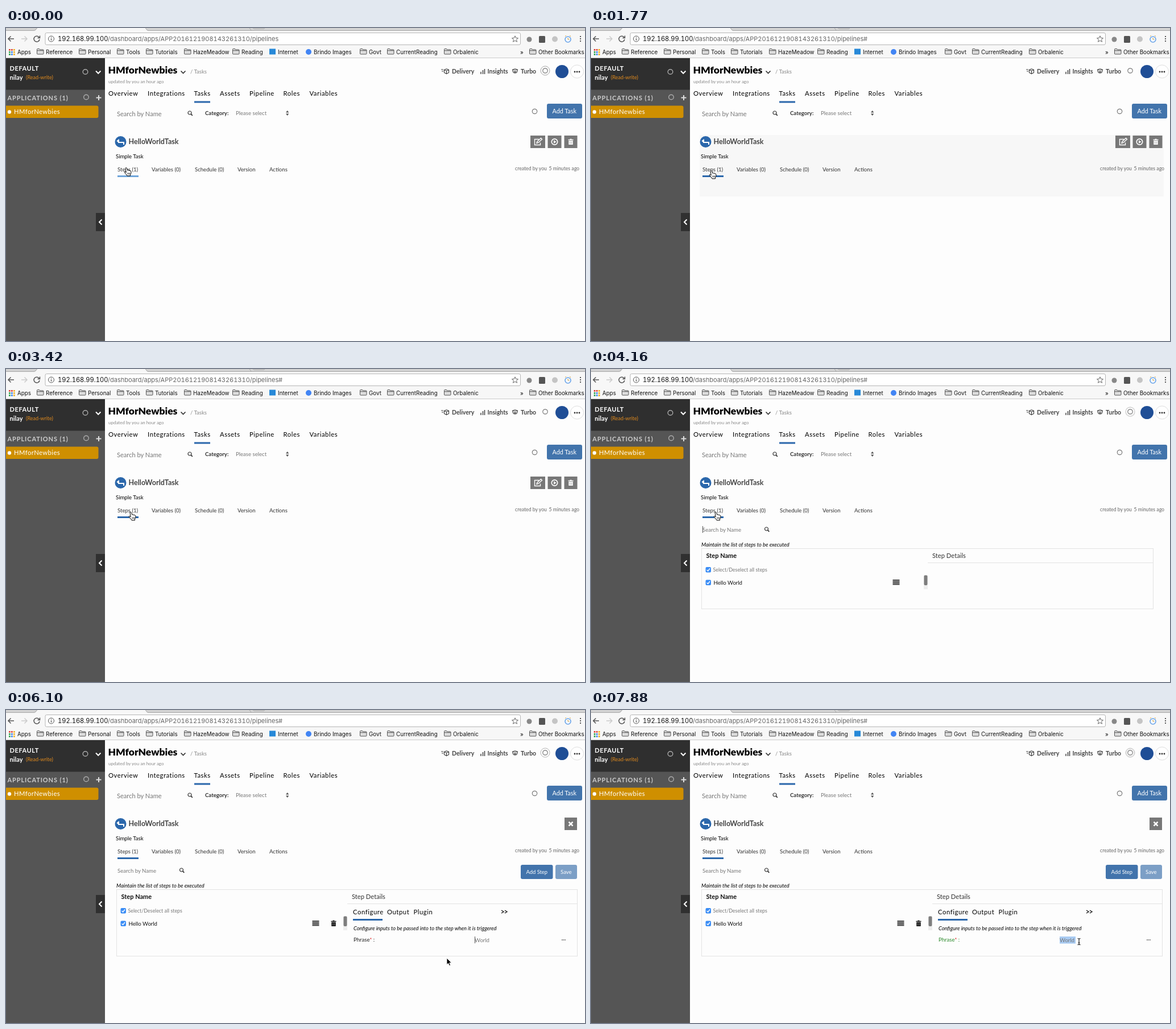
Write an HTML page that moves like this. It is 1018 px wide and 550 px high and loops after 8 s.

```html
<!DOCTYPE html>
<html lang="en">
<head>
<meta charset="utf-8">
<title>Task steps</title>
<style>
html, body { margin: 0; width: 100%; height: 100%; overflow: hidden; background: #fdfdfd; }
svg { display: block; width: 1018px; height: 550px; }
text { font-family: Lato, sans-serif; font-size: 9.6px; fill: #333; white-space: pre; }
.ui text { font-family: Inter, sans-serif; font-size: 9.8px; fill: #111; }
.ui .host { font-size: 11.15px; font-variant-numeric: tabular-nums; }
.ui .path { font-size: 11px; fill: #666; font-variant-numeric: tabular-nums; }
.nav text { font-size: 11.3px; letter-spacing: .55px; fill: #000; }
.bold { font-weight: 700; }
.top text { font-size: 10.5px; font-weight: 700; fill: #444; }
.note { font-size: 9.4px; font-style: italic; fill: #000; }
.gray { fill: #777; }
.white { fill: #fff; }
.line { fill: none; stroke: #444; stroke-width: 1.2; }
.thick { fill: none; stroke: #fff; stroke-width: 2; }

/* One loop is 8 s, so 1% is 80 ms. */
.a { animation: 8s step-end infinite; }
.hash { animation-name: hash; }
@keyframes hash { 0% { opacity: 0 } 7.3% { opacity: 1 } }
.under { animation-name: under; animation-timing-function: linear; }
@keyframes under { 0%, 3% { fill: #6fa5da } 9%, 100% { fill: #2b67ab } }
.hover { animation-name: hover; animation-timing-function: linear; }
@keyframes hover { 0%, 9% { opacity: 0 } 14.7%, 27.7% { opacity: 1 } 33%, 100% { opacity: 0 } }
.steps { animation-name: steps; }
@keyframes steps { 0% { opacity: 0 } 50.1% { opacity: 1 } }
.tools { animation-name: tools; }
@keyframes tools { 0% { opacity: 1 } 50.1% { opacity: 0 } }
.close { animation-name: close; }
@keyframes close { 0% { opacity: 0 } 55.7% { opacity: 1 } }
.panel { animation-name: panel; }
@keyframes panel {
  0% { width: 794px; height: 106px }
  55.7% { width: 810px; height: 106px }
  67% { width: 810px; height: 117px }
}
.shift { animation-name: shift; }
@keyframes shift { 0% { transform: translateX(-8px) } 55.7% { transform: none } }
.rule { animation-name: rule; }
@keyframes rule { 0% { width: 396px } 55.7% { width: 404px } }
.details { animation-name: details; }
@keyframes details { 0% { opacity: 0 } 67% { opacity: 1 } }
.before { animation-name: before; }
@keyframes before { 0% { opacity: 1 } 67% { opacity: 0 } }
.label { animation-name: label; }
@keyframes label { 0% { fill: #222 } 96.6% { fill: #2c8a2c } }
.picked { animation-name: picked; }
@keyframes picked { 0% { opacity: 0 } 96.6% { opacity: 1 } }
.unpicked { animation-name: unpicked; }
@keyframes unpicked { 0% { opacity: 1 } 96.6% { opacity: 0 } }
.blink { animation: blink 1.06s step-end infinite; }
@keyframes blink { 0% { opacity: 0 } 50% { opacity: 1 } }

.pulse { fill: none; stroke: #888; transform-box: fill-box; transform-origin: center;
  animation: pulse 2s linear infinite; }
@keyframes pulse {
  0% { opacity: 0; transform: scale(.6) }
  3% { opacity: .8; transform: scale(.95) }
  10% { opacity: .75; transform: scale(1) }
  18% { opacity: .5; transform: scale(1) }
  27%, 100% { opacity: 0; transform: scale(1.1) }
}

.cursor { animation: move 8s linear infinite; }
@keyframes move {
  0%, 4% { transform: translate(211px, 245px) }
  8%, 31% { transform: translate(211px, 250px) }
  40%, 57.7% { transform: translate(219px, 251px) }
  63%, 72% { transform: translate(337px, 379px) }
  76%, 78% { transform: translate(775px, 436px) }
  85.5%, 100% { transform: translate(858px, 407px) }
}
.hand { animation-name: hand; }
@keyframes hand { 0% { opacity: 1 } 74% { opacity: 0 } }
.arrow { animation-name: arrow; }
@keyframes arrow { 0% { opacity: 0 } 74% { opacity: 1 } 83.5% { opacity: 0 } }
.beam { animation-name: beam; }
@keyframes beam { 0% { opacity: 0 } 83.5% { opacity: 1 } }
</style>
</head>
<body>
<svg viewBox="0 0 1018 550">
  <defs>
    <g id="glass" fill="none" stroke="#333"><circle r="3" stroke-width="1.2"/><path d="M2.2 2.2L4.800 4.800" stroke-width="1.700"/></g>
    <g id="trash"><path d="M-4.500-3.500h9M-1.500-4.500h3" fill="none" stroke="currentColor" stroke-width="1.500"/><path d="M-3.700-2h7.400v7h-7.400z" fill="currentColor"/><path d="M-1.300-.8v4.600M1.300-.8v4.600" stroke="#999" stroke-width=".8"/></g>
    <g id="check"><rect width="9.500" height="9.500" rx="2" fill="#3b8df5"/><path d="M2.200 4.900L4.200 7 7.500 2.500" fill="none" stroke="#fff" stroke-width="1.400"/></g>
    <path id="folder" d="M.5 1.500q0-1 1-1h3l1.200 1.500h5.300q1 0 1 1v6q0 1-1 1H1.500q-1 0-1-1zM.5 3.700h11.500" fill="#ddd" stroke="#555"/>
  </defs>
  <rect width="1018" height="550" fill="#fdfdfd"/>

  <g class="ui" id="browser">
    <rect width="1018" height="53" fill="#f7f7f7"/>
    <path d="M0 0H1018V4.500H248L245 0H55L52 4.500H0z" fill="#d3d3d3"/>
    <path d="M0 4.500H50L55 0M245 0L249 4.500H1018M428 0l3 4M434 0l3 1.500h16l2-1.500" fill="none" stroke="#a8a8a8"/>
    <path d="M0 52.500H1018" stroke="#ccc"/>
    <rect x="69" y="8.500" width="835.500" height="21" rx="2.500" fill="#fff" stroke="#b5b5b5"/>
    <path d="M14 19H4M8.500 14.500L4 19l4.500 4.500" fill="none" stroke="#555" stroke-width="1.500"/>
    <path d="M27 19h10M32.500 14.500L37 19l-4.500 4.500" fill="none" stroke="#ccc" stroke-width="1.500"/>
    <path d="M58.300 16.500A5 5 0 1 0 59 20M59.500 13.500v4h-4" fill="none" stroke="#555" stroke-width="1.500"/>
    <circle cx="79.500" cy="19" r="5" fill="none" stroke="#555"/><path d="M79.500 18.200v3.600M79.500 15.800v1.200" stroke="#555" stroke-width="1.300"/>
    <text x="91" y="23" class="host">192.168.99.100</text>
    <text x="179" y="23" class="path">/dashboard/apps/APP2016121908143261310/pipelines</text>
    <text x="479" y="23" class="path a hash">#</text>
    <path d="M895 13.800l1.500 3.700 4 .3-3 2.600 1 3.900-3.500-2.100-3.500 2.100 1-3.900-3-2.600 4-.3z" fill="none" stroke="#666"/>
    <circle cx="920" cy="20" r="4.500" fill="#888"/>
    <rect x="937" y="14" width="11" height="12" rx="1.500" fill="#555"/>
    <circle cx="965" cy="19.500" r="5" fill="#c4c4c4"/>
    <circle cx="988" cy="20" r="5" fill="#f3f8ff" stroke="#6aa4e8" stroke-width="1.600"/><path d="M988 17v3h2.500M983 15l2-2M993 15l-2-2" fill="none" stroke="#d6a23c"/>
    <path d="M1010 14v2m0 2v2m0 2v2" stroke="#555" stroke-width="2"/>
    <rect x="463" y="36.500" width="11" height="10" fill="#2789d8"/>
    <circle cx="532" cy="42" r="5" fill="#4285f4"/>
    <text x="20" y="45.500">Apps</text>
    <text x="478" y="45.500">Internet</text>
    <text x="541" y="45.500">Brindo Images</text>
    <text x="904" y="45.500">»</text>
  </g>

  <g id="sidebar">
    <rect y="53" width="174" height="497" fill="#555"/>
    <rect y="53" width="174" height="55.500" fill="#2f2f2f"/>
    <text x="6.500" y="75" class="bold white" style="font-size:11px;letter-spacing:.6px">DEFAULT</text>
    <text x="6.500" y="90.500" class="bold white" style="font-size:11px">nilay</text>
    <text x="35" y="90" style="font-size:9px;fill:#e08a1e">(Read-write)</text>
    <text x="2.500" y="127" class="bold" style="font-size:11px;letter-spacing:.9px;fill:#ccc">APPLICATIONS (1)</text>
    <g fill="none" stroke="#aaa" stroke-width="1.400"><circle cx="139.500" cy="77" r="4.300"/><circle cx="141" cy="121.500" r="4.300"/></g>
    <path class="thick" d="M158 75.500l4.200 4.300 4.200-4.300"/>
    <path class="thick" d="M158.500 122.500h9M163 118v9" style="stroke:#ddd"/>
    <path d="M0 136.500h159.500q3 0 3 3v15.500q0 3-3 3H0z" fill="#cf8f00"/>
    <circle cx="6" cy="147.500" r="3.200" fill="#fff"/>
    <text x="14" y="151" class="white" style="font-size:11.300px;letter-spacing:.4px">HMforNewbies</text>
    <rect x="158" y="325" width="16" height="32" fill="#303030"/>
    <path class="thick" d="M168.500 336.500l-4.500 4.500 4.500 4.500"/>
  </g>

  <g id="header">
    <text x="179.500" y="79.500" style="font-size:17.500px;font-weight:900;fill:#000">HMforNewbies</text>
    <path d="M307.500 75.500l4 4 4-4" fill="none" stroke="#333" stroke-width="1.700"/>
    <text x="324" y="79.500" style="fill:#888">/ Tasks</text>
    <text x="180" y="97" style="font-size:8px;fill:#888">updated by you an hour ago</text>
    <g class="top"><text x="784" y="79.500">Delivery</text><text x="846.500" y="79.500">Insights</text><text x="905" y="79.500">Turbo</text></g>
    <path class="line" d="M770.500 73.500l4-1.700 4 1.700v5l-4 2-4-2zM770.500 73.500l4 1.700 4-1.700M774.500 75v5.500M765 73h4M766 76h3"/>
    <path d="M835 81v-4M838.500 81v-7M841.500 81v-9" stroke="#444" stroke-width="1.500"/>
    <path class="line" d="M890 73.500q5-3 10 0M891 75.500a4 3.500 0 1 0 8 0 4 3 0 1 0-8 0M893.500 76.500a1.500 1.500 0 1 0 3 0 1.500 1.500 0 1 0-3 0"/>
    <g class="line" style="stroke:#777"><circle cx="948" cy="75" r="4.200"/><circle cx="929.500" cy="146.500" r="4.200"/></g>
    <circle cx="977.500" cy="76.500" r="11.500" fill="#1f4e96"/>
    <circle cx="1004" cy="76.500" r="11.500" fill="#fff" stroke="#ddd"/>
    <g fill="#333"><circle cx="1000" cy="77" r="1.400"/><circle cx="1004" cy="77" r="1.400"/><circle cx="1008" cy="77" r="1.400"/></g>
    <g class="nav">
      <text x="180" y="119">Overview</text><text x="249" y="119">Integrations</text><text x="330.500" y="119">Tasks</text><text x="376" y="119">Assets</text><text x="428" y="119">Pipeline</text><text x="487.500" y="119">Roles</text><text x="533.500" y="119">Variables</text>
    </g>
    <rect x="331" y="128.500" width="28" height="3" fill="#2b67ab"/>
    <text x="195" y="154.500" class="gray" style="font-size:11.100px">Search by Name</text>
    <use href="#glass" x="323" y="149"/>
    <text x="350" y="153" class="bold">Category:</text>
    <text x="404" y="153" class="gray">Please select</text>
    <path d="M492 148.500l2.700-3.500 2.700 3.500zM492 150.500l2.700 3.500 2.700-3.500z" fill="#555"/>
    <rect x="951" y="133" width="62" height="26" rx="3" fill="#4274ac"/>
    <text x="960.500" y="150" class="white" style="font-size:10.800px">Add Task</text>
  </g>

  <rect class="a hover" x="191" y="188" width="816" height="108" fill="#f7f7f7"/>
  <g id="task">
    <circle cx="201.500" cy="200" r="10" fill="#2b67ab"/>
    <path d="M198 198.500h-2.500M198 196v5h9v4" fill="none" stroke="#fff" stroke-width="2"/><path d="M194.500 198.500l4-3.500v7z" fill="#fff"/>
    <text x="215.500" y="203.500" class="bold" style="font-size:12.550px;fill:#444">HelloWorldTask</text>
    <text x="193" y="228.500" style="fill:#000">Simple Task</text>
    <text x="196" y="251.500">Steps (1)</text><text x="256" y="251.500">Variables (0)</text><text x="332" y="251.500">Schedule (0)</text><text x="407" y="251.500">Version</text><text x="463" y="251.500">Actions</text>
    <rect class="a under" x="196" y="259" width="37" height="3"/>
    <text x="895" y="249.500" style="font-size:8.700px;fill:#666">created by you</text>
    <text x="954.500" y="249.500" style="font-size:8.700px;fill:#666">5 minutes ago</text>
    <g class="a tools">
      <path d="M922 189h26v22h-26zM952.500 189h24v22h-24zM981.500 189h23v22h-23z" fill="#777"/>
      <path d="M937 195.500h-7.500v10h10v-4M933 202.500l1-3 6.500-6 2 2-6.500 6z" fill="none" stroke="#fff" stroke-width="1.400"/>
      <circle cx="964.500" cy="200" r="5.200" fill="none" stroke="#fff" stroke-width="1.700"/><path d="M963 197l4.500 3-4.500 3z" fill="#fff"/>
      <use href="#trash" x="993" y="200" color="#fff"/>
    </g>
    <g class="a close"><path d="M982 189h22v22h-22z" fill="#777"/><path d="M989.500 196.700l7 7M996.500 196.700l-7 7" stroke="#fff" stroke-width="2.600"/></g>
  </g>

  <g class="a steps">
    <text x="196" y="285.500" class="gray">Search by Name</text>
    <g class="a before"><path class="blink" d="M196.500 276v12" stroke="#555"/></g>
    <use href="#glass" x="308.500" y="281"/>
    <text x="194" y="311.500" class="note">Maintain the list of steps to be executed</text>
    <rect class="a panel" x="194.500" y="315.500" fill="none" stroke="#e3e3e3"/>
    <text x="202.500" y="332" class="bold" style="font-size:11px;fill:#111">Step Name</text>
    <use href="#check" x="201.500" y="348"/><use href="#check" x="201.500" y="370.500"/>
    <text x="214.500" y="356" class="gray" style="font-size:8.900px">Select/Deselect all steps</text>
    <text x="215.500" y="379" style="fill:#111">Hello World</text>
    <g class="a shift">
      <text x="608" y="332" style="font-size:11.200px">Step Details</text>
      <rect class="a rule" x="600" y="340" height="1" fill="#e3e3e3"/>
      <path d="M538.500 371h12M538.500 373.500h12M538.500 376h12M538.500 378.500h12" stroke="#111" stroke-width="1.400"/>
      <rect x="593" y="362" width="7" height="25" fill="#eee"/><rect x="593.500" y="362.500" width="6" height="17.500" rx="2" fill="#7d7d7d"/>
    </g>
  </g>

  <g class="a details">
    <rect x="905" y="272" width="56.500" height="25" rx="3" fill="#4274ac"/><text x="914.500" y="287.500" class="white" style="font-size:9.400px">Add Step</text>
    <rect x="966" y="272" width="38" height="25" rx="3" fill="#7c9fc6"/><text x="975" y="287.500" class="white">Save</text>
    <use href="#trash" x="576" y="375" color="#111"/>
    <g class="nav"><text x="610" y="359">Configure</text><text x="670" y="359">Output</text><text x="716.500" y="359">Plugin</text></g>
    <rect x="610" y="367" width="52" height="3" fill="#2b67ab"/>
    <path d="M871 352l4 2.500-4 2.500M877 352l4 2.500-4 2.500" fill="none" stroke="#111" stroke-width="1.300"/>
    <text x="611" y="386.500" class="note">Configure inputs to be passed into to the step when it is triggered</text>
    <text x="611" y="407" class="a label">Phrase<tspan fill="#d22">*</tspan> :</text>
    <rect class="a picked" x="824" y="398" width="28" height="12.500" fill="#a9cbf2"/>
    <text x="824" y="407.500" class="gray">World</text>
    <g class="a unpicked"><path class="blink" d="M824.500 398v12" stroke="#555"/></g>
    <path d="M977 404h1.600M979.600 404h1.600M982.200 404h1.600" stroke="#555" stroke-width="1.600"/>
  </g>

  <circle class="pulse" cx="948" cy="75" r="8" style="animation-delay:-.18s"/>
  <circle class="pulse" cx="929.500" cy="146.500" r="8" style="animation-delay:-1.130s"/>
  <circle class="pulse" cx="139.500" cy="77" r="8" style="animation-delay:-1.580s"/>

  <g class="cursor" stroke-linejoin="round">
    <path class="a hand" d="M-1 1.200q1.200-1.700 2.500 0l1.200 4 1-.6 1.200.9 1.300-.5 1 1 1 .1.800 1.700-.3 3-1.200 2v2H2l-1-1.800-3.700-4.200q-.3-1.700 1.200-1.200l1.700 1.400z" fill="#fff" stroke="#000"/>
    <path class="a hand" d="M3 9.500v2.800M4.900 9.500v2.800M6.700 9.500v2.800" stroke="#000" stroke-width=".8"/>
    <path class="a arrow" d="M0 0v11.500l2.600-2.500 1.900 4.300 2-.9-1.900-4.200h3.600z" fill="#000" stroke="#fff" stroke-width=".8"/>
    <path class="a beam" d="M-2.500-5.500q2.500 0 2.500 1.500 0-1.500 2.500-1.500M0-4.500v9M-2.500 5.500q2.500 0 2.500-1.500 0 1.500 2.500 1.500M-1.500 2h3" fill="none" stroke="#111" stroke-width="1.100"/>
  </g>
</svg>
<script>
const browser = document.getElementById('browser');

function add(tag, attrs, text = '') {
  const el = document.createElementNS('http://www.w3.org/2000/svg', tag);
  for (const key in attrs) el.setAttribute(key, attrs[key]);
  el.textContent = text;
  browser.append(el);
}

const folders = {
  Reference: 54, Personal: 128, Tools: 195, Tutorials: 246, HazeMeadow: 313, Reading: 398,
  Govt: 622, CurrentReading: 670, Orbalenic: 770, 'Other Bookmarks': 920
};
for (const [name, x] of Object.entries(folders)) {
  add('use', { href: '#folder', x, y: 36 });
  add('text', { x: x + 16, y: 45.5 }, name);
}

const dotColors = ['#e0483e', '#e0483e', '#f0b429', '#35a853', '#4285f4', '#f0b429', '#35a853', '#4285f4', '#f0b429'];
dotColors.forEach((fill, i) =>
  add('rect', { x: 5 + i % 3 * 4, y: 37 + Math.floor(i / 3) * 4, width: 2.8, height: 2.8, fill }));
</script>
</body>
</html>
```
